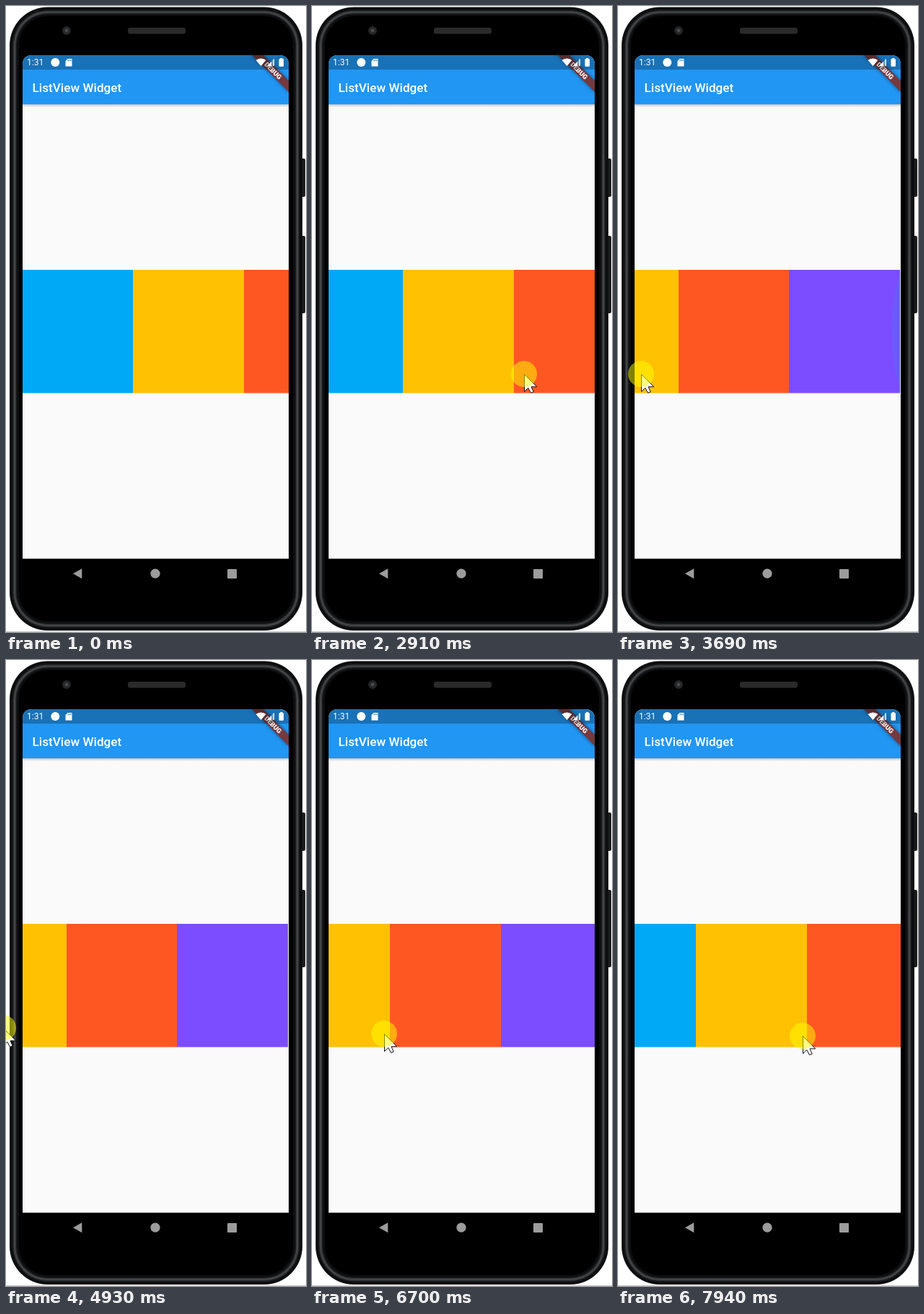
These frames come from a looping animation (416 by 866 pixels, 8000 ms). An HTML page with a canvas:

```html
<!DOCTYPE html>
<html lang="en">
<head>
<meta charset="utf-8">
<title>ListView Widget</title>
<style>
html, body { margin: 0; width: 100%; height: 100%; overflow: hidden; background: #fff; }
canvas { display: block; }
</style>
</head>
<body>
<canvas id="stage" width="416" height="866"></canvas>
<script>
const c = document.getElementById('stage').getContext('2d');
const LOOP = 8000, START = 345, TICK = 77.4;
const LEFT = 23, TOP = 68, WIDTH = 369, RIGHT = LEFT + WIDTH;
const LIST = { y: 365, h: 170.5, item: 153.5 };
const MAX_SCROLL = 246;
const COLORS = ['#00a9f6', '#ffc102', '#ff5722', '#7c4dff'];

const clamp = (v, lo, hi) => Math.min(hi, Math.max(lo, v));
const ramp = (k, from, to) => clamp((k - from) / (to - from), 0, 1);
const bezier = (p, a, b, d) => (1 - p) ** 2 * a + 2 * p * (1 - p) * b + p * p * d;

// Motion, in ticks: swipe left off the phone, peek in, come back, swipe right
function swipeX(k) {
  const peek = k < 59 ? 0 : 1 - ramp(k, 59, 63);
  return 365 - 385 * ramp(k, 30.3, 45) + 16 * peek + 92 * ramp(k, 68, 77)
    + 28 * ramp(k, 80, 82) + 73 * ramp(k, 82, 90) + 83 * ramp(k, 90, 98);
}

function cursor(k) {
  if (k < 5) return [387, 846 + 13 * Math.exp(-k)];
  if (k < 16) {
    const p = ramp(k, 5, 16);
    return [bezier(p, 387, -24, 365), bezier(p, 846, 520, 510)];
  }
  return [swipeX(k), 510 - ramp(k, 20, 29) + 11 * ramp(k, 59, 90)];
}

function scrollAt(k) {
  const x = swipeX(k);
  if (k < 68) return clamp(344 - x, 0, MAX_SCROLL);
  const lag = 7.5 * Math.sin(Math.PI * ramp(k, 82, 98));
  return Math.min(MAX_SCROLL, MAX_SCROLL - 0.985 * (x - 75) + lag);
}

const glowAt = k => ramp(k, 40, 45) * (1 - ramp(k, 47, 60));
const isPressed = k => (k >= 27 && k < 63) || k >= 77;

function rect(x, y, w, h, fill) {
  c.fillStyle = fill;
  c.fillRect(x, y, w, h);
}

function round(x, y, w, h, r, fill) {
  c.beginPath();
  c.roundRect(x, y, w, h, r);
  c.fillStyle = fill;
  c.fill();
}

function disc(x, y, r, fill) {
  c.beginPath();
  c.arc(x, y, r, 0, Math.PI * 2);
  c.fillStyle = fill;
  c.fill();
}

function poly(points, fill) {
  c.beginPath();
  points.forEach(([x, y]) => c.lineTo(x, y));
  c.closePath();
  c.fillStyle = fill;
  c.fill();
}

function text(str, x, y, font, align = 'left') {
  c.font = font + ' Roboto, sans-serif';
  c.textAlign = align;
  c.fillStyle = '#fff';
  c.fillText(str, x, y);
}

function phone() {
  rect(0, 0, 416, 866, '#fff');
  rect(0, 865, 416, 1, '#c8c8c8');
  round(409, 211, 6, 53, 2, '#1b1c1e');
  round(409, 318, 6, 107, 2, '#1b1c1e');
  // Nested outlines make the metal rim
  for (let i = 0; i < 13; i++) {
    const v = 12 + 60 * Math.exp(-(((i - 6.5) / 2) ** 2));
    round(5 + i, 1.5 + i, 406 - 2 * i, 862.5 - 2 * i, 53 - i, `rgb(${v},${v + 1},${v + 3})`);
  }
  round(18, 14, 380, 837, 40, '#000');
  round(169, 30, 80, 8.5, 3, '#2a2a2b');
  disc(84, 34, 6, '#242526');
  disc(84, 34, 2.5, '#48494b');
}

function list(scroll, glow) {
  COLORS.forEach((color, i) => {
    const edge = n => Math.floor(LEFT + n * LIST.item - scroll);
    rect(edge(i), LIST.y, edge(i + 1) - edge(i), LIST.h, color);
  });
  if (glow > 0) {
    const depth = 21 * glow, half = LIST.h / 2;
    const r = (half * half + depth * depth) / (2 * depth);
    c.save();
    c.beginPath();
    c.rect(LEFT, LIST.y, WIDTH, LIST.h);
    c.clip();
    disc(RIGHT - depth + r, LIST.y + half, r, `rgba(33,150,243,${0.3 * glow})`);
    c.restore();
  }
}

function banner() {
  c.save();
  c.translate(RIGHT, TOP);
  c.rotate(Math.PI / 4);
  c.shadowColor = 'rgba(0,0,0,0.5)';
  c.shadowBlur = 5;
  rect(-36, 25.1, 72, 10.8, '#75393f');
  c.shadowBlur = 0;
  text('DEBUG', 0, 33.8, '900 9.2px', 'center');
  c.restore();
}

function statusBar() {
  rect(LEFT, TOP, WIDTH, 20, 'rgba(0,0,0,0.25)');
  text('1:31', 29, 82.3, '12px');
  disc(68.3, 78, 6, '#fff');
  poly([[85.5, 73], [91.5, 73], [91.5, 83.5], [82.5, 83.5], [82.5, 76]], '#fff');
  for (let i = 0; i < 3; i++) rect(85.5 + 2 * i, 74.2, 1, 2, '#196fb6');
  c.beginPath();
  c.moveTo(353.5, 83);
  c.arc(353.5, 83, 10.5, -Math.PI * 0.73, -Math.PI * 0.27);
  c.fillStyle = '#fff';
  c.fill();
  poly([[372, 73], [372, 83], [362, 83]], 'rgba(255,255,255,0.35)');
  poly([[368, 77], [368, 83], [362, 83]], '#fff');
  rect(370.5, 73.5, 1.3, 9.5, '#fff');
  round(378.5, 73.3, 6.5, 10.5, 1, '#fff');
  rect(380.3, 72, 3, 2, '#fff');
}

function navBar() {
  const grey = '#9c9c9c';
  rect(LEFT, 764.6, WIDTH, 42, '#000');
  poly([[93, 785.3], [105.3, 778.3], [105.3, 792.3]], grey);
  disc(207, 785.2, 6.6, grey);
  round(307, 779, 13, 13, 1, grey);
}

function app(scroll, glow) {
  c.save();
  c.beginPath();
  c.roundRect(LEFT, TOP, WIDTH, 738, 12);
  c.clip();
  rect(LEFT, TOP, WIDTH, 700, '#fafafa');
  const shade = c.createLinearGradient(0, 136, 0, 140);
  shade.addColorStop(0, 'rgba(0,0,0,0.22)');
  shade.addColorStop(1, 'rgba(0,0,0,0)');
  rect(LEFT, 136, WIDTH, 4, shade);
  rect(LEFT, TOP, WIDTH, 68, '#2196f3');
  text('ListView Widget', 36.5, 118.5, '500 17.15px');
  list(scroll, glow);
  banner();
  statusBar();
  navBar();
  c.restore();
}

function pointer(x, y, pressed) {
  c.save();
  c.translate(x, y);
  poly([[0.5, 0.5], [0.5, 24.5], [5.8, 19.3], [9.5, 26.3], [13.2, 24.9], [10, 17.8], [17.7, 17.8]], '#fff');
  c.strokeStyle = '#111';
  c.lineWidth = 1;
  c.stroke();
  c.restore();
  if (pressed) disc(x, y, 18, 'rgba(255,255,0,0.5)');
}

function draw(t) {
  const k = Math.floor((t - START) / TICK);
  phone();
  app(scrollAt(k), glowAt(k));
  if (k < 0) return;
  const [x, y] = cursor(k);
  pointer(Math.round(x), Math.round(y), isPressed(k));
}

const begin = performance.now();
function frame() {
  draw((performance.now() - begin) % LOOP);
  requestAnimationFrame(frame);
}
frame();
</script>
</body>
</html>
```
